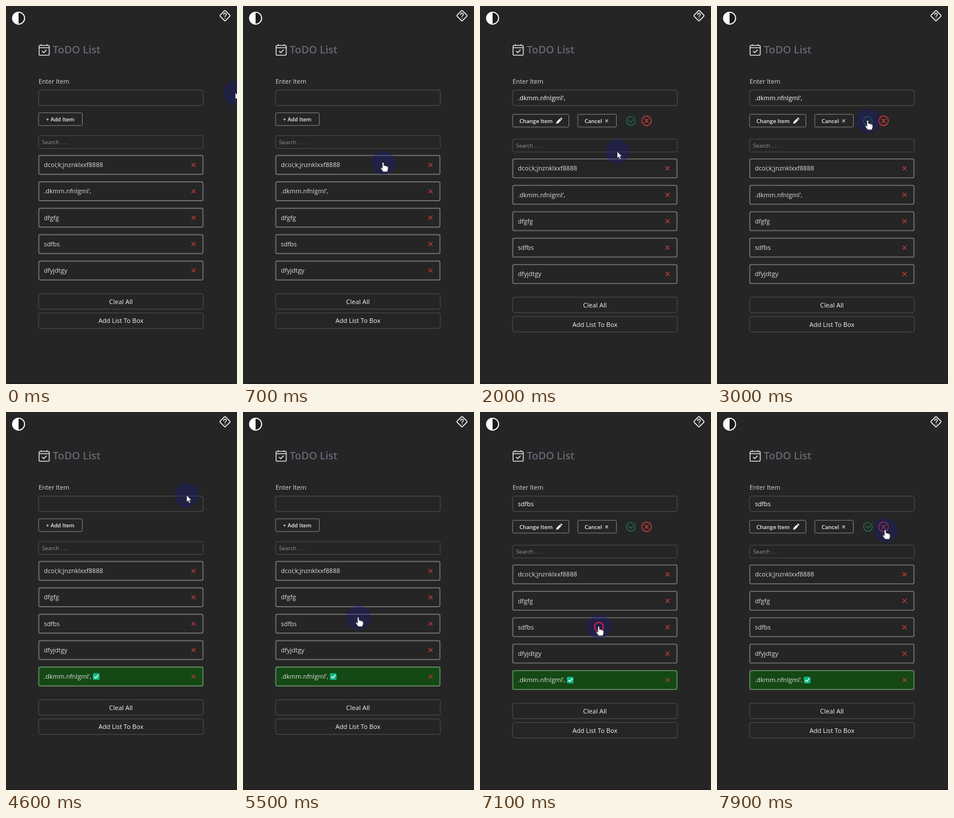
An HTML page for the animation above (8 s loop, 404 by 662 pixels).

```html
<!DOCTYPE html>
<html lang="en">
<head>
<meta charset="utf-8">
<title>ToDO List</title>
<style>
  html, body { margin: 0; width: 100%; height: 100%; overflow: hidden; background: #252526; }
  svg { display: block; width: 404px; height: 662px; font-family: "Open Sans", "Noto Sans", sans-serif; }
  path { stroke-linecap: round; stroke-linejoin: round; }
</style>
</head>
<body>
<svg viewBox="0 0 404 662" fill="none">
  <rect width="404" height="662" fill="#252526"/>
  <rect y="661" width="404" height="1" fill="#1d1718"/>

  <circle cx="22" cy="21.3" r="10.5" fill="#1b1b1e" stroke="#fff" stroke-width="1.8"/>
  <path d="M22 10.8A10.5 10.5 0 0 0 22 31.8Z" fill="#fff"/>

  <rect x="376.3" y="10.3" width="13.4" height="13.4" rx="1.6" transform="rotate(45 383 17)" stroke="#eee" stroke-width="1.6"/>
  <path d="M380.7 15.2C380.8 11.6 385.6 11.8 385.4 15C385.3 16.7 383.2 16.8 383.1 18.8M383.1 21.3V21.4" stroke="#eee" stroke-width="1.5"/>

  <rect x="57.8" y="69" width="17.8" height="17.2" rx="2" stroke="#d6d6d6" stroke-width="1.6"/>
  <path d="M58 73H75.5M61.7 67.5V69M71.7 67.5V69M63.5 79.3L66 81.7L70.5 77.2" stroke="#d6d6d6" stroke-width="1.7"/>
  <text x="81.8" y="83.4" font-size="18.2" font-weight="600" fill="#646872">ToDO List</text>
  <text x="57" y="136.3" font-size="11" font-weight="500" fill="#d8d8d8">Enter Item</text>

  <g id="view"></g>

  <g id="pointer">
    <circle r="21.2" fill="#1a148a" opacity=".3"/>
    <circle id="ring" stroke="#ba2650" stroke-width="2.8"/>
    <path id="arrow" d="M0 0V11.6L2.7 9.2L4.6 13.4L6.5 12.6L4.6 8.5H8.2Z" fill="#fff" stroke="#222" stroke-width=".6"/>
    <path id="hand" d="M-1.8 .8C-1.8 -.8 .8 -.8 .8 .8V5.2C2 4.4 3.3 4.8 3.5 5.9C4.7 5.2 5.8 5.7 6 6.7C7.4 6.3 8.2 7 8.2 8.2V11.5L6.8 15.8H-.3L-4.4 10.4C-5.3 9 -3.6 7.9 -2.6 9L-1.8 9.9Z" fill="#fff" stroke="#222" stroke-width=".6"/>
  </g>
</svg>
<script>
const LOOP = 8000, STEP = 100, SHIFT = 6.2, PITCH = 46.25;
const $ = id => document.getElementById(id);
const RED = '#c63a38', DONE = ".dkmm.nfnlgml',";
const pending = ['dcoi;k;jnznklxxf8888', DONE, 'dfgfg', 'sdfbs', 'dfyjdtgy'];
const finished = [...pending.filter(name => name !== DONE), DONE];

const scenes = [
  { at: 0, items: pending },
  { at: 1500, items: pending, edit: DONE },
  { at: 3400, items: finished, done: true },
  { at: 7000, items: finished, done: true, edit: 'sdfbs' },
];
const clicks = scenes.slice(1).map(s => s.at);

// Pointer hotspot: time, x, y
const route = [
  [0, 401, 152], [100, 398, 153], [500, 305, 225], [900, 196, 318], [1250, 190, 336],
  [1600, 190, 337], [2000, 240, 255], [2300, 272, 205], [2700, 264, 201],
  [4150, 264, 201], [4300, 267, 200], [4400, 267, 200], [4600, 316, 146],
  [4800, 325, 92], [5050, 268, 205], [5300, 206, 335], [5500, 202, 360],
  [6250, 202, 360], [6800, 208, 376], [7100, 208, 376], [7450, 255, 275],
  [7800, 293, 205], [7900, 294.5, 207], [8000, 294.5, 207],
];

const box = (x, y, w, h, stroke, width = 1, r = 3.5, fill = 'none') =>
  `<rect x="${x}" y="${y}" width="${w}" height="${h}" rx="${r}" stroke="${stroke}" stroke-width="${width}" fill="${fill}"/>`;
const label = (str, x, y, size, fill = '#f0f0f0', extra = '') =>
  `<text x="${x}" y="${y}" font-size="${size}" fill="${fill}" ${extra}>${str}</text>`;
const line = (d, stroke, width) => `<path d="${d}" stroke="${stroke}" stroke-width="${width}"/>`;
const cross = (x, y, r, stroke, width) =>
  line(`M${x - r} ${y - r}l${2 * r} ${2 * r}m0 ${-2 * r}l${-2 * r} ${2 * r}`, stroke, width);
const medium = 'font-weight="500"', bold = 'font-weight="600"';

function editBar() {
  return box(57, 189.7, 98.5, 22.3, '#858585', 1, 2) + label('Change Item', 69, 204.6, 9.5, '#f0f0f0', bold) +
    '<path d="M133.2 206.2L134 202.8L139.6 197.2L142.2 199.8L136.6 205.4ZM140.3 196.5L141.3 195.6Q142 195.1 142.8 195.9L143.6 196.7Q144.2 197.4 143.7 198.2L142.9 199.1Z" fill="#fff"/>' +
    box(171, 189.7, 67.5, 22.3, '#858585', 1, 2) + label('Cancel', 183, 204.6, 9.5, '#f0f0f0', bold) +
    cross(221.5, 201.2, 2, '#eee', 1.2) +
    line('M271.3 199.8A7.6 7.6 0 1 1 267.4 194.4M260.5 200.4L263.6 203.6L271.3 195.4', '#20704f', 1.5) +
    `<circle cx="291.3" cy="201" r="8.4" stroke="${RED}" stroke-width="1.6"/>` +
    cross(291.3, 201, 3.1, RED, 1.6);
}

function itemRow(name, y, done) {
  const tick = done
    ? `<rect x="152" y="${y - 5.6}" width="11.6" height="11.4" rx="1.6" fill="#12b588"/>` +
      line(`M154.6 ${y + .3}l2.3 2.4l4.3 -5`, '#fff', 1.5)
    : '';
  return box(57.4, y - 16.5, 287, 33, done ? '#5d865d' : '#6c6c6c', 1.9, 2.5, done ? '#144814' : 'none') +
    label(name, 66.3, y + 4, 11, '#dedede') + tick + cross(328, y, 3.1, RED, 1.3);
}

function draw({ items, edit, done }) {
  const dy = edit ? SHIFT : 0;
  const wide = (y, str, size) => box(57, y, 288, 27, '#515151') +
    label(str, 201, y + 17.8, size, '#f4f4f4', medium + ' text-anchor="middle"');
  return box(57, 147.3, 288, 27, '#545454') +
    (edit ? label(edit, 66.3, 164.8, 11, '#fff', medium) + editBar()
          : box(57, 187, 76.5, 22.3, '#858585', 1, 2) + label('+ Add Item', 70, 201.8, 9.5, '#f0f0f0', bold)) +
    `<g transform="translate(0 ${dy})">` +
    box(57, 227, 288, 22.5, '#4d4d4d', 1, 2.5) + label('Search . . .', 63, 241.8, 9.6, '#979797') +
    items.map((name, i) => itemRow(name, 278.2 + i * PITCH, done && name === DONE)).join('') +
    wide(503.8, 'Cleal All', 11.3) + wide(537.6, 'Add List To Box', 11.1) + '</g>';
}

// Cubic Hermite through the route, at rest wherever a leg stands still
function pointerAt(t) {
  const i = Math.max(0, route.findIndex(p => p[0] > t) - 1);
  const a = route[i], b = route[i + 1], span = b[0] - a[0], u = (t - a[0]) / span;
  const still = (p, q) => !p || !q || Math.hypot(p[1] - q[1], p[2] - q[2]) < 2;
  const slope = (k, axis) => {
    const p = route[k - 1], q = route[k], r = route[k + 1];
    return still(p, q) || still(q, r) ? 0 : (r[axis] - p[axis]) / (r[0] - p[0]);
  };
  return [1, 2].map(axis => {
    const m = slope(i, axis) * span, n = slope(i + 1, axis) * span, v = 1 - u;
    return a[axis] * v * v * (1 + 2 * u) + b[axis] * u * u * (3 - 2 * u) + m * u * v * v - n * u * u * v;
  });
}

function clickable(x, y, edit) {
  const row = (y - 261.5 - (edit ? SHIFT : 0)) / PITCH;
  const onItem = x > 57 && x < 345 && row > 0 && row < 5 && row % 1 < .74;
  const onBar = edit && y > 190 && y < 212 && (x < 156 || x > 171 && x < 239 || x > 255 && x < 300);
  return onItem || onBar;
}

let shown;
function render(time) {
  const t = Math.floor(time % LOOP / STEP) * STEP;
  const scene = scenes.filter(s => s.at <= t).pop();
  if (scene !== shown) $('view').innerHTML = draw(shown = scene);

  const [x, y] = pointerAt(t);
  const hand = clickable(x, y, scene.edit);
  $('pointer').setAttribute('transform', `translate(${x} ${y})`);
  $('hand').setAttribute('opacity', hand ? 1 : 0);
  $('arrow').setAttribute('opacity', hand ? 0 : 1);

  const age = Math.min(...clicks.map(c => t < c ? Infinity : t - c));
  $('ring').setAttribute('r', age < 300 ? 4.7 + age * .03 : 0);
  $('ring').setAttribute('opacity', age < 300 ? Math.min(1, 1.3 - age / 250) : 0);
}

const start = performance.now();
(function tick() {
  render(performance.now() - start);
  requestAnimationFrame(tick);
})();
</script>
</body>
</html>
```
